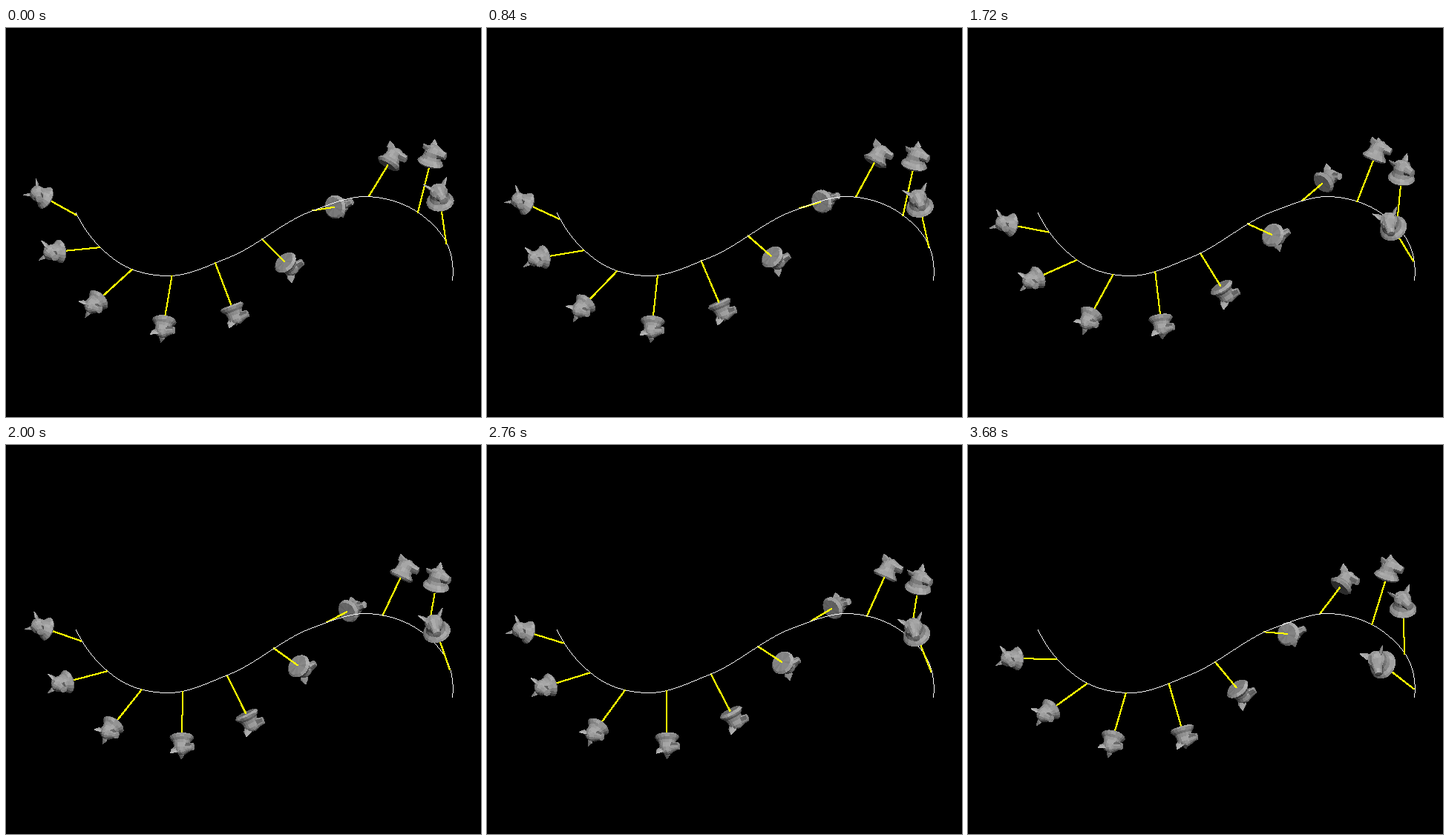
Animation of 640 by 525 pixels, one loop 3720 ms. Source, as a matplotlib script:

```python
import numpy as np
import matplotlib.pyplot as plt
from matplotlib.animation import FuncAnimation
from matplotlib.collections import LineCollection, PolyCollection

W, H, DPI = 640, 525, 100
FRAMES, STEP = 93, 40
HEADS = 10
PX = 72 / DPI
LIGHT = np.array([0.11, -0.44, 0.89])
rng = np.random.default_rng(4)


def unit(v):
    return v / (np.linalg.norm(v, axis=-1, keepdims=True) + 1e-9)


def bump(q, mid, width):
    return np.exp(-((q - mid) / width) ** 2)


def spline(keys, points, q):
    """Cubic Hermite curve through the points, read at q."""
    points = np.asarray(points, float)
    slopes = np.gradient(points, keys, axis=0, edge_order=2)
    i = np.clip(np.searchsorted(keys, q, side="right") - 1, 0, len(keys) - 2)
    h = (keys[i + 1] - keys[i])[:, None]
    s = (q - keys[i])[:, None] / h
    return ((1 + 2 * s) * (1 - s) ** 2 * points[i] + s * (1 - s) ** 2 * h * slopes[i]
            + s * s * (3 - 2 * s) * points[i + 1] + s * s * (s - 1) * h * slopes[i + 1])


def running(steps):
    return np.r_[0, np.cumsum(steps)]


def along(keys, points, q):
    return np.column_stack([np.interp(q, keys, column) for column in points.T])


# ---- the rail -------------------------------------------------------------
knots = np.array([(93, 249), (125, 295), (161, 322), (217, 334), (297, 310),
                  (412, 246), (485, 227), (550, 246), (595, 296), (600, 341)])
chord = running(np.hypot(*np.diff(knots, axis=0).T))
rail = spline(chord, knots, np.linspace(0, chord[-1], 800))
arc = running(np.hypot(*np.diff(rail, axis=0).T))
tangents = unit(np.gradient(rail, axis=0))
# One dot for each pixel step gives a crisp line.
steps = running(np.abs(np.diff(rail, axis=0)).max(axis=1))
dots = along(steps, rail, np.arange(steps[-1])).round()

# Where the middle of a head is at each slot along the rail.
stations = [(44, 224), (62, 302), (117, 373), (211, 405), (308, 387), (382, 322),
            (449, 240), (521, 173), (574, 170), (583, 224), (540, 310)]


# ---- motion ---------------------------------------------------------------
def phase(ms):
    """Slots travelled; a head moves on one slot in about 369 ms."""
    return max(0, (ms - 62) / 368.8)


def foot_arc(q):
    """Distance along the rail, uneven because the rail leans in depth."""
    a = np.pi * q / HEADS
    return 3.5 + 62.7 * q - 12 * np.sin(a) - 20 * np.sin(2 * a) + 8 * np.sin(3 * a)


def mount_depth(q):
    return 0.43 - 1.32 * bump(q, 5.7, 1.6) + 0.38 * bump(q, 9.8, 1.3)


def snout_depth(q):
    return 0.3 + 1.3 * bump(q, 0, 2.5) + 0.6 * bump(q, 9.8, 1.2)


def head_size(q):
    return 0.98 + 0.22 / (1 + np.exp(-2 * (q - 8.3)))


# ---- the trophy head: axes are side, out of the mount, up ------------------
def tube(spine, radii, u, v, n):
    """Quads and outward normals of a tube around a spine."""
    a = np.linspace(0, 2 * np.pi, n + 1)[None, :, None]
    spine, radii = np.array(spine, float), np.array(radii, float)
    p = (spine[:, None] + radii[:, None, :1] * np.cos(a) * np.array(u)
         + radii[:, None, 1:] * np.sin(a) * np.array(v))
    quads = np.stack([p[:-1, :-1], p[1:, :-1], p[1:, 1:], p[:-1, 1:]], axis=2)
    quads = quads.reshape(-1, 4, 3)
    normals = unit(np.cross(quads[:, 2] - quads[:, 0], quads[:, 3] - quads[:, 1]))
    mids = quads.mean(axis=1)
    outward = np.sign((normals * (mids - mids.mean(axis=0))).sum())
    return quads, normals * outward


def build_head():
    neck = [(0, 0), (0, 14), (2.5, 16.5), (5, 15), (8, 12), (13, 10.5),
            (19, 10.5), (23, 8.5), (26, 0)]
    body = tube([(0, out, 0) for out, _ in neck],
                [(0.95 * r, r) for _, r in neck], (1, 0, 0), (0, 0, 1), 18)
    muzzle = [(-4, 0), (-3, 8), (3, 9), (9, 6.5), (14, 5), (18, 4.5), (18.5, 0)]
    snout = tube([(0, 18, -d) for d, _ in muzzle],
                 [(0.9 * r, r) for _, r in muzzle], (1, 0, 0), (0, 1, 0), 14)
    ears = [tube([(4 * s, 18, 3), (4 * s, 18, 3), (9.5 * s, 23, 6), (14.5 * s, 28, 9)],
                 [(0, 0), (4.2, 2.2), (5, 1.6), (0, 0)],
                 (0, -0.45, 0.9), (0.6 * s, -0.7, -0.35), 8) for s in (-1, 1)]
    quads, normals = (np.concatenate(x) for x in zip(body, snout, *ears))
    tint = rng.uniform(0.93, 1.05, len(quads))
    _, out, up = quads.mean(axis=1).T
    tint[(up < -9) & (up > -17) & (out > 14.5) & (out < 17)] *= 0.65    # mouth
    tint[normals[:, 1] < -0.9] *= 0.85                                  # back board
    return quads, normals, tint


quads, normals, tint = build_head()


def place(q, middle, foot, tangent):
    """Visible faces, their greys and the stem of one head."""
    depth, size = mount_depth(q), head_size(q)
    flat = unit(middle - foot) * np.sqrt(1 - depth ** 2)
    axis = np.array([*flat, depth])
    snout = np.array([*tangent, snout_depth(q)])
    up = -unit(snout - axis * (snout @ axis))
    basis = np.array([np.cross(axis, up), axis, up])
    mount = middle - 14 * size * flat
    n = normals @ basis
    pts = quads @ basis * size
    seen = np.flatnonzero(n[:, 2] > 0)
    seen = seen[np.argsort(pts[seen, :, 2].mean(axis=1))]
    lit = np.maximum(n[seen] @ LIGHT, 0) ** 0.8
    return pts[seen, :, :2] + mount, (0.2 + 0.48 * lit) * tint[seen], (foot, mount)


# ---- stage ----------------------------------------------------------------
fig = plt.figure(figsize=(W / DPI, H / DPI), dpi=DPI, facecolor="black")
ax = fig.add_axes([0, 0, 1, 1])
ax.set(xlim=(-0.5, W - 0.5), ylim=(H - 0.5, -0.5))
ax.axis("off")
ax.plot(*dots.T, ",", color="white", zorder=3)


def add_layer(mesh_z, stem_z):
    mesh = PolyCollection([], antialiased=False, linewidths=0, zorder=mesh_z)
    stems = LineCollection([], colors="#ffff00", linewidths=PX,
                           antialiased=False, zorder=stem_z)
    ax.add_collection(mesh, autolim=False)
    ax.add_collection(stems, autolim=False)
    return mesh, stems


# Heads behind the rail show their stem in front, the others hide it.
far, near = add_layer(1, 2), add_layer(5, 4)


def fill(layer, items):
    mesh, stems = layer
    faces, greys, lines = zip(*items)
    mesh.set_verts(np.concatenate(faces))
    mesh.set_facecolor(np.repeat(np.concatenate(greys)[:, None], 3, axis=1))
    stems.set_segments(lines)


def update(i):
    slots = np.sort((np.arange(HEADS) + phase(i * STEP)) % HEADS)
    s = foot_arc(slots)
    heads = list(zip(slots, spline(np.arange(HEADS + 1), stations, slots),
                     along(arc, rail, s), along(arc, tangents, s)))
    fill(far, [place(*h) for h in heads if mount_depth(h[0]) < 0])
    fill(near, [place(*h) for h in heads if mount_depth(h[0]) >= 0])
    return [*far, *near]


anim = FuncAnimation(fig, update, frames=FRAMES, interval=STEP,
                     repeat=True, repeat_delay=0, blit=False)
plt.show()
```
